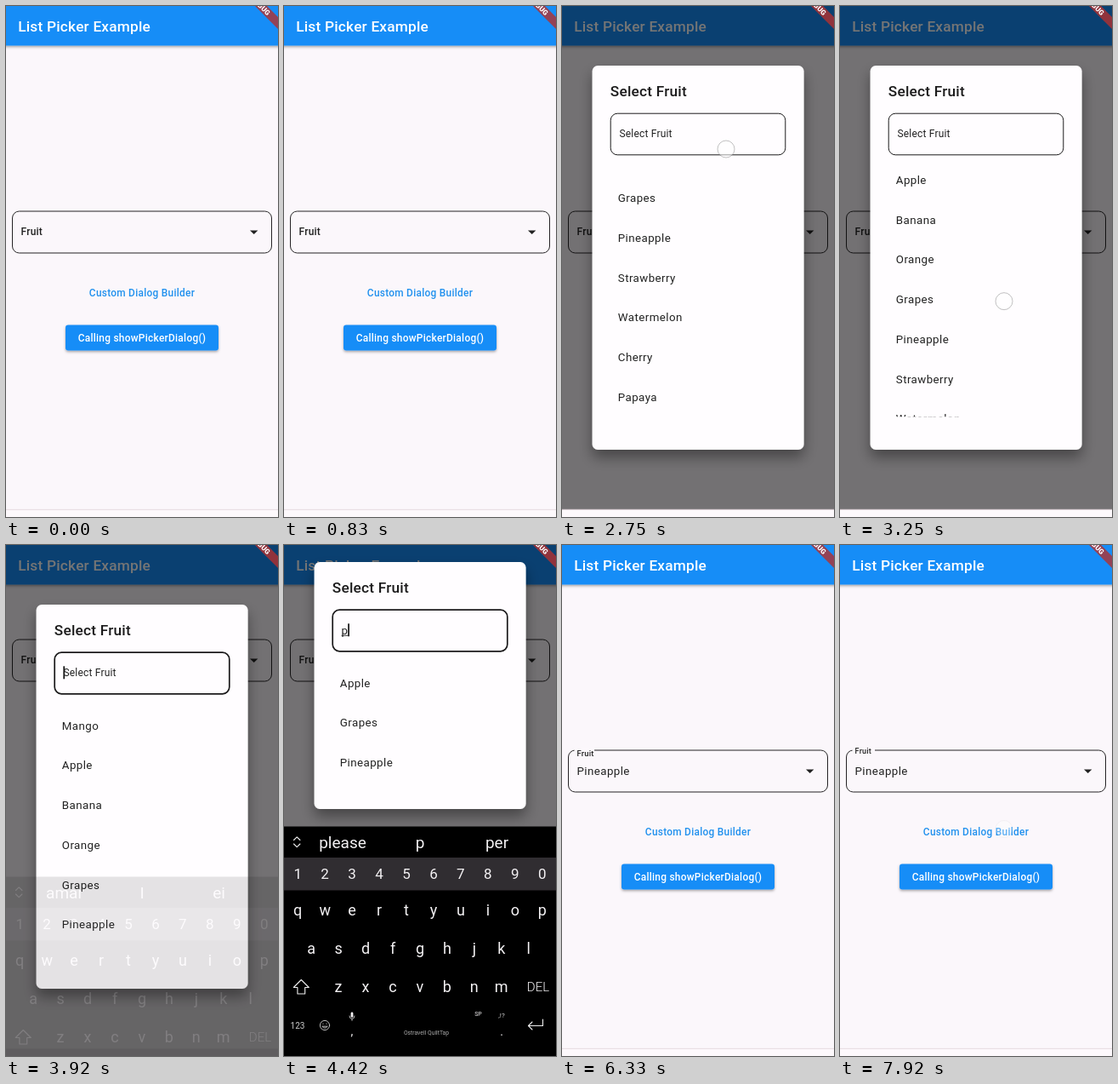
Animation, 320 px wide and 600 px high, one loop 8 s. Source, as an HTML page:

```html
<!DOCTYPE html>
<html lang="en">
<head>
<meta charset="utf-8">
<title>List picker</title>
<style>
  html, body { margin: 0; width: 100%; height: 100%; overflow: hidden; background: #fbf7fb; }
  svg { display: block; width: 320px; height: 600px; font-family: Roboto, sans-serif; }
  text { white-space: pre; }
</style>
</head>
<body>
<svg id="stage" viewBox="0 0 320 600">
  <defs>
    <filter id="cardShadow" x="-20%" y="-20%" width="140%" height="140%">
      <feDropShadow dx="0" dy="9" stdDeviation="8" flood-opacity=".38"/>
    </filter>
    <filter id="lowShadow" x="-10%" y="-20%" width="120%" height="150%">
      <feDropShadow dx="0" dy="1.6" stdDeviation="1.4" flood-opacity=".35"/>
    </filter>
    <clipPath id="listClip"><rect id="listWindow" x="36" y="188.7" width="248" height="293.6"/></clipPath>
  </defs>

  <rect width="320" height="600" fill="#fbf7fb"/>
  <g id="page">
    <rect x="7.5" y="241" width="305" height="49" rx="8" fill="none" stroke="#252325"/>
    <path id="gap" stroke="#fbf7fb" stroke-width="2.4"/>
    <path d="M287 263.4h9.4l-4.7 4.7z" fill="#222"/>
    <rect x="70" y="374.5" width="180" height="30" rx="3.2" fill="#188df7" filter="url(#lowShadow)"/>
  </g>
  <g id="bar"><rect x="-8" y="-20" width="336" height="66.5" fill="#188df7" filter="url(#lowShadow)"/></g>
  <rect id="dim" width="320" height="592" fill="#000"/>
  <rect id="nav" y="591.5" width="320" height="8.5"/>
  <path d="M0 591.3H320" stroke="#e6dadf" id="navLine"/>

  <g id="dialog">
    <rect id="card" x="35.6" y="70" width="249" rx="6.5" fill="#fffdff" filter="url(#cardShadow)"/>
    <rect id="search" x="57.2" y="126.2" width="205.6" height="48.6" rx="8" fill="none" stroke="#1b1a1b"/>
    <g clip-path="url(#listClip)"><g id="list"></g></g>
    <path id="underline" stroke="#222" stroke-width=".9"/>
    <rect id="cursor" y="142.3" width="1.7" height="15" fill="#111"/>
  </g>

  <g id="keyboard" fill="#f4f2f4">
    <rect y="330.5" width="320" height="400" fill="#000"/>
    <rect y="367" width="320" height="38.5" fill="#302d31"/>
    <g fill="none" stroke="#eee" stroke-width="1.1" stroke-linejoin="round" stroke-linecap="round">
      <path d="M11.5 346.5l3.7-3.7 3.7 3.7M11.5 351l3.7 3.7 3.7-3.7"/>
      <path d="M20.3 510.5l9 9h-4.6v7.5h-8.8v-7.5h-4.6z"/>
      <path d="M304.5 557v7.5h-17m4.5-4.5l-4.5 4.5 4.5 4.5"/>
      <g stroke="#ccc" stroke-width=".9">
        <circle cx="48" cy="564" r="5.6"/>
        <path d="M45 565.5q3 3.6 6 0zM46 562v.4M50 562v.4"/>
        <path d="M77 553q0 3.4 3 3.4t3-3.4M80 556.4v2"/>
      </g>
    </g>
    <rect x="78.6" y="548.5" width="2.8" height="6.3" rx="1.4"/>
  </g>

  <circle id="touch" r="10" fill="#fff" fill-opacity=".55" stroke="#777" stroke-opacity=".45"/>
  <g id="ribbon" transform="translate(300 0) rotate(45)">
    <rect x="-40" y="-5" width="80" height="10" fill="#b3302f" opacity=".8"/>
  </g>
</svg>
<script>
const $ = id => document.getElementById(id);
const set = (el, attrs) => { for (const k in attrs) el.setAttribute(k, attrs[k]); return el; };
const clamp = (v, a = 0, b = 1) => Math.min(b, Math.max(a, v));
const lerp = (a, b, p) => a + (b - a) * p;
const ramp = (t, a, b) => clamp((t - a) / (b - a));
const smooth = p => p * p * (3 - 2 * p);

// y is the middle of the capital letters
function label(parent, str, x, y, size, opts = {}) {
  const el = document.createElementNS('http://www.w3.org/2000/svg', 'text');
  set(el, { x, y: y + size * .355, 'font-size': size, 'letter-spacing': .2, ...opts });
  el.textContent = str;
  return parent.appendChild(el);
}

const medium = { 'font-weight': 500 };
const centered = { 'text-anchor': 'middle', 'letter-spacing': 0 };
const buttonText = { ...medium, 'text-anchor': 'middle', 'letter-spacing': .27 };
const itemText = { fill: '#222', 'letter-spacing': .417 };
const page = $('page'), dialog = $('dialog'), keyboard = $('keyboard');

label($('bar'), 'List Picker Example', 14.2, 24, 17.3, { ...medium, fill: '#fff' });
label($('ribbon'), 'DEBUG', 0, 0, 8.3, { ...centered, 'font-weight': 900, fill: '#fff' });
const fieldLabel = label(page, 'Fruit', 17.6, 265, 12, { ...medium, fill: '#222' });
const fieldValue = label(page, 'Pineapple', 17.5, 265, 13.34, itemText);
label(page, 'Custom Dialog Builder', 160, 336.5, 11.9, { ...buttonText, fill: '#2191ee' });
label(page, 'Calling showPickerDialog()', 160, 390, 11.9, { ...buttonText, fill: '#fff' });

label(dialog, 'Select Fruit', 56.8, 100.3, 17.3, { ...medium, fill: '#1c1b1c' });
const hint = label(dialog, 'Select Fruit', 67.4, 150, 12, { fill: '#222' });
const query = label(dialog, '', 67.4, 150, 13.34, itemText);

const rowHeight = 46.7;
const fruits = ['Mango', 'Apple', 'Banana', 'Orange', 'Grapes', 'Pineapple',
  'Strawberry', 'Watermelon', 'Cherry', 'Papaya'];
const rows = fruits.map(name => label($('list'), name, 65.8, 0, 13.34, itemText));

const keyRow = (keys, x, y, size) =>
  [...keys].forEach((k, i) => label(keyboard, k, x + i * 31.95, y, size, centered));
keyRow('1234567890', 16.2, 386, 17);
keyRow('qwertyuiop', 16.2, 428.5, 18);
keyRow('asdfghjkl', 32.2, 473.5, 18);
keyRow('zxcvbnm', 64, 518.5, 18);
label(keyboard, 'DEL', 299, 519, 15, { ...centered, 'font-weight': 300 });
label(keyboard, '123', 16, 564, 10, { ...centered, fill: '#ccc' });
label(keyboard, ',', 80, 571, 14, centered);
label(keyboard, '.', 256, 571, 14, centered);
label(keyboard, 'SP', 228.5, 550.5, 7, centered);
label(keyboard, ',!?', 256, 552.5, 8, { ...centered, fill: '#ccc' });
label(keyboard, 'Ostravell QuiltTap', 167.5, 573, 6.8, { ...centered, fill: '#aaa' });
const suggestions = [69, 160, 250.5].map(x => label(keyboard, '', x, 349, 19, centered));

function drawPage(t, raised) {
  page.setAttribute('transform', `translate(0 ${raised ? -130 : 0})`);
  const p = ramp(t, 6165, 6370);
  const rise = t < 6400 ? clamp(smooth(p) * .97) : 1;
  const size = lerp(12, 9, rise);
  set(fieldLabel, { y: lerp(265, 241.6, rise) + size * .355, 'font-size': size });
  set($('gap'), { d: `M14.5 241h${26.5 * rise}`, opacity: rise > 0 ? 1 : 0 });
  fieldValue.setAttribute('opacity', rise > 0 ? 1 : 0);
}

function drawDialog(t, typed, lifted) {
  const fade = t < 1410 ? 0 : 1 - ramp(t, 5950, 6170);
  $('dim').setAttribute('opacity', .54 * fade);
  set(dialog, { opacity: fade, transform: `translate(0 ${lifted ? -50 : 0})` });
  const cut = lifted ? 161 : 0;
  $('card').setAttribute('height', 451 - cut);
  $('listWindow').setAttribute('height', 293.6 - cut);

  const focused = t >= 3660;
  $('search').setAttribute('stroke-width', focused ? 1.7 : 1);
  query.textContent = typed;
  hint.setAttribute('opacity', typed ? 0 : 1);

  const caretX = [67.4, 75.2, 79][typed.length];
  const blinkStart = [3666, 4416, 4750][typed.length];
  const caretOn = focused && Math.floor((t - blinkStart + 1) / 520) % 2 === 0;
  set($('cursor'), { x: caretX, opacity: caretOn ? 1 : 0 });
  set($('underline'), { d: `M67.6 156.3H${caretX}`, opacity: typed ? 1 : 0 });

  const scroll = 173.4 * (smooth(ramp(t, 2090, 2580)) - smooth(ramp(t, 2830, 3500)));
  let slot = 0;
  fruits.forEach((name, i) => {
    const match = name.toLowerCase().includes(typed);
    const y = 212 + rowHeight * slot - scroll;
    set(rows[i], { y: y + 4.74, opacity: match ? 1 : 0 });
    if (match) slot++;
  });
}

function drawKeyboard(t, typed) {
  const opening = t < 3990, closing = ramp(t, 6000, 6166);
  const shown = t < 3910 ? 0 : opening ? .1 : 1 - closing;
  const drop = opening ? 59 : 90 * closing;
  set(keyboard, { opacity: shown, transform: `translate(0 ${drop})` });
  $('nav').setAttribute('fill', shown > 0 ? '#6b696b' : '#fdf9fc');
  $('navLine').setAttribute('opacity', shown > 0 ? 0 : 1);
  const words = [['amar', 'I', 'ei'], ['please', 'p', 'per'], ['pictures', 'pi', 'piya']][typed.length];
  suggestions.forEach((el, i) => {
    el.textContent = words[i];
    el.setAttribute('font-size', words[i].length > 6 ? 15.2 : 19);
  });
}

function drawTouch(t) {
  let x = 193, y = 168, opacity = 0;
  if (t >= 2160 && t < 2830) {
    y = lerp(345, 168, smooth(ramp(t, 2090, 2580)));
    opacity = 1;
  } else if (t >= 2910 && t < 3400) {
    y = lerp(230, 400, smooth(ramp(t, 2830, 3500)));
    opacity = 1;
  } else if (t >= 7660) {
    y = 333.5;
    opacity = t < 7830 ? .35 : .5;
  }
  set($('touch'), { cx: x, cy: y, opacity, 'stroke-opacity': t > 7000 ? .12 : .45 });
}

function render(ms) {
  const frame = 1000 / 12;
  const t = Math.floor((ms % 8000 + 5) / frame) * frame;
  const typed = t < 4410 ? '' : t < 4745 ? 'p' : 'pi';
  drawPage(t, t >= 3910 && t < 6160);
  drawDialog(t, typed, t >= 3990);
  drawKeyboard(t, typed);
  drawTouch(t);
}

const start = performance.now();
function tick() {
  render(performance.now() - start);
  requestAnimationFrame(tick);
}
render(0);
requestAnimationFrame(tick);
</script>
</body>
</html>
```
